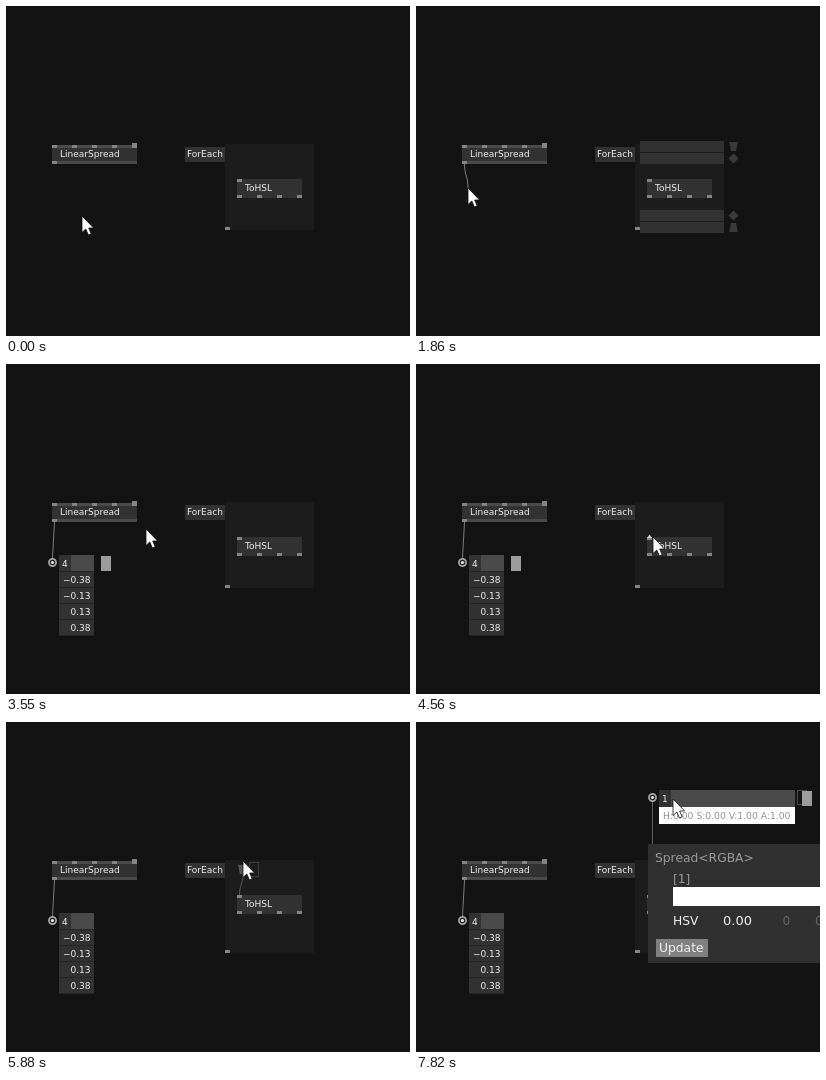
Write an HTML page that moves like this. It is 404 px wide and 330 px high and loops after 8 s.

```html
<!DOCTYPE html>
<html lang="en">
<head>
<meta charset="utf-8">
<title>Patch editor</title>
<style>
html, body { margin: 0; width: 100%; height: 100%; overflow: hidden; background: #131313; }
svg { display: block; width: 404px; height: 330px; }
rect { shape-rendering: crispEdges; }
text { font-family: "DejaVu Sans", sans-serif; font-size: 9px; fill: #f0f0f0; white-space: pre; }
.big text { font-size: 12.3px; }
.wire { fill: none; stroke: #7c7c7c; }
.dim { stroke: #5c5c5c; }
</style>
</head>
<body>
<svg id="stage" viewBox="0 0 404 330"></svg>
<script>
const LOOP = 8000;
const stage = document.getElementById('stage');
const NODE = '#323232', STRIP = '#4a4a4a', PIN = '#848484', GRIP = '#9c9c9c';

function add(parent, tag, attrs, text) {
  const el = document.createElementNS('http://www.w3.org/2000/svg', tag);
  for (const k in attrs) el.setAttribute(k, attrs[k]);
  if (text) el.textContent = text;
  parent.appendChild(el);
  return el;
}
const group = (cls = '') => add(stage, 'g', { class: cls });
const rect = (g, x, y, width, height, fill) => add(g, 'rect', { x, y, width, height, fill });
const label = (g, x, y, text, more = {}) => add(g, 'text', { x, y, ...more }, text);
const shape = (g, d, fill) => add(g, 'path', { d, fill });
const wire = (g, cls = '') => add(g, 'path', { class: 'wire ' + cls });
const pins = (g, y, xs) => xs.forEach(x => rect(g, x, y, 5, 3, PIN));
const link = (x1, y1, x2, y2) => {
  const m = (y1 + y2) / 2;
  return `M${x1} ${y1}C${x1} ${m} ${x2} ${m} ${x2} ${y2}`;
};
function knob(g, cx, cy) {
  add(g, 'circle', { cx, cy, r: 3.6, fill: '#222', stroke: '#a8a8a8', 'stroke-width': 1.7 });
  add(g, 'circle', { cx, cy, r: 1.6, fill: '#e4e4e4' });
}

// loop region
const base = group();
const region = rect(base, 219, 138, 89, 86, '#1c1c1c');
const regionPin = rect(base, 219, 221, 5, 3, PIN);
rect(base, 179, 141, 40, 15, NODE);
label(base, 181, 151, 'ForEach');

const bars = group();
[135, 147, 204, 216].forEach(y => rect(bars, 224, y, 84, 11, NODE));
shape(bars, 'M313 136H322L320 145H315Z', '#3a3a3a');
shape(bars, 'M315 217H320L322 226H313Z', '#3a3a3a');
[152.5, 209.5].forEach(y => shape(bars, `M312.5 ${y}l5 -5l5 5l-5 5Z`, '#3a3a3a'));

// nodes
const nodes = group();
rect(nodes, 46, 139, 85, 19, STRIP);
rect(nodes, 46, 142, 85, 13, NODE);
pins(nodes, 139, [46, 66, 86, 106]);
pins(nodes, 155, [46]);
rect(nodes, 126, 137, 5, 5, PIN);
label(nodes, 54, 151, 'LinearSpread');
rect(nodes, 231, 173, 65, 19, NODE);
pins(nodes, 173, [231]);
pins(nodes, 189, [231, 251, 271, 291]);
label(nodes, 239, 185, 'ToHSL');

// links
const links = group();
const outLink = wire(links);
const inLink = wire(links, 'dim');
const upLink = wire(links, 'dim');
const funnel = shape(links, 'M232 143H241L239 152H234Z', '#565656');
const hotPin = shape(links, 'M231 174L233.5 170.5L236 174Z', '#d0d0d0');
const ghost = add(links, 'rect', { x: 243.5, y: 140.5, width: 9, height: 14, fill: 'none', stroke: '#3c3c3c' });

// value box with four numbers
const values = group();
rect(values, 53, 191, 35, 81, '#262626');
rect(values, 53, 191, 12, 16, NODE);
rect(values, 65, 191, 23, 16, STRIP);
label(values, 56, 203, '4');
['−0.38', '−0.13', '0.13', '0.38'].forEach((v, i) => {
  rect(values, 53, 208 + 16 * i, 35, 15, NODE);
  label(values, 84.5, 219 + 16 * i, v, { 'text-anchor': 'end' });
});
knob(values, 46.5, 198.5);
const grip = rect(stage, 95, 192, 10, 15, GRIP);

// colour box
const colour = group();
rect(colour, 243, 68, 136, 17, STRIP);
rect(colour, 243, 68, 12, 17, NODE);
label(colour, 246, 80, '1');
rect(colour, 243, 85, 136, 17, '#fff');
label(colour, 247, 97, 'H:0.00 S:0.00 V:1.00 A:1.00', { style: 'font-size:9.2px;fill:#929292' });
knob(colour, 236.5, 75.5);
const ghost2 = add(stage, 'rect', { x: 381.5, y: 68.5, width: 9, height: 14, fill: 'none', stroke: '#4a4a4a' });
const grip2 = rect(stage, 386, 69, 10, 15, GRIP);

// inspector popup
const popup = group('big');
rect(popup, 232, 122, 172, 119, '#303030');
label(popup, 239, 140, 'Spread<RGBA>', { style: 'fill:#9a9a9a' });
label(popup, 257, 161, '[1]', { style: 'fill:#9a9a9a' });
rect(popup, 257, 165, 147, 19, '#fff');
label(popup, 257, 203, 'HSV');
label(popup, 307, 203, '0.00', { style: 'font-size:13px' });
label(popup, 366.5, 203, '0', { style: 'fill:#666' });
label(popup, 399, 203, '0', { style: 'fill:#666' });
rect(popup, 240, 217, 52, 18, '#808080');
label(popup, 243, 230, 'Update');

const cursor = add(stage, 'path', {
  d: 'M0 0V16.5L3.8 13L6.4 19L9.2 17.8L6.7 12H11.6Z',
  fill: '#fff', stroke: '#111', 'stroke-width': 0.8
});

// cursor path: time, x, y
const path = [
  [0, 76, 210], [300, 76, 210], [1060, 48, 158], [1250, 48, 158],
  [1850, 52, 182], [1920, 52, 182], [2400, 47, 198], [3080, 47, 198],
  [3540, 140, 165], [3610, 140, 165], [3870, 206, 124], [4540, 237, 173],
  [4800, 237, 173], [5500, 237, 141], [5580, 237, 141], [5700, 237, 139],
  [5930, 237, 139], [6520, 237, 77], [7570, 237, 77], [7760, 257, 77], [LOOP, 257, 77]
];
function cursorAt(t) {
  let i = 1;
  while (i < path.length - 1 && t > path[i][0]) i++;
  const [t0, x0, y0] = path[i - 1], [t1, x1, y1] = path[i];
  const u = (t - t0) / (t1 - t0), e = u * u * (3 - 2 * u);
  return [x0 + (x1 - x0) * e, y0 + (y1 - y0) * e];
}
const show = (el, on) => { el.style.display = on ? '' : 'none'; };

function draw(t) {
  const [x, y] = cursorAt(t);
  cursor.setAttribute('transform', `translate(${x} ${y})`);
  const within = (a, b = LOOP) => t >= a && t < b;

  show(bars, within(1210, 3080) || within(4800, 5880));
  show(values, within(3080));
  show(grip, within(3140, 4740));
  show(hotPin, within(4540, 4740));
  show(funnel, within(5880));
  show(ghost, within(5880, 6000));
  show(colour, within(7150));
  show(grip2, within(7210));
  show(ghost2, within(7760));
  show(popup, within(7760));

  const grow = within(5880) ? 7 : 0;
  region.setAttribute('height', 86 + grow);
  regionPin.setAttribute('y', 221 + grow);

  show(outLink, within(1210));
  outLink.setAttribute('d', t < 3080 ? link(48.5, 158, x, y) : 'M48.5 158L46.5 194');
  show(inLink, within(4800));
  inLink.setAttribute('d', t < 5880 ? link(233.5, 173, x, y) : link(233.5, 173, 237, 152));
  show(upLink, within(5930));
  upLink.setAttribute('d', `M236.5 143V${t < 7150 ? y : 80}`);
}

const start = performance.now();
function tick() {
  draw((performance.now() - start) % LOOP);
  requestAnimationFrame(tick);
}
tick();
</script>
</body>
</html>
```
